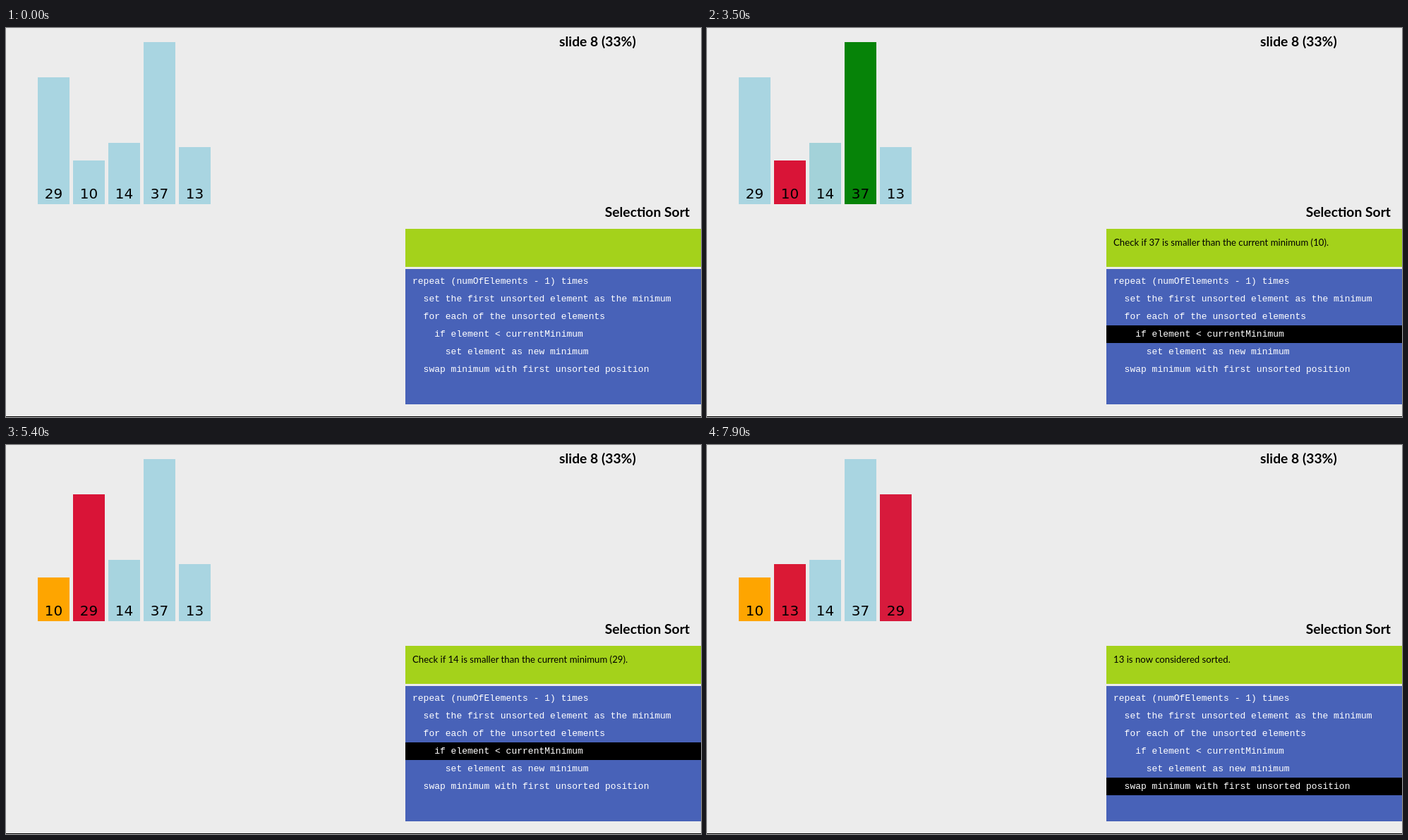
An HTML page for the animation above (8 s loop, 985 by 552 pixels).

```html
<!DOCTYPE html>
<html lang="en">
<meta charset="utf-8">
<title>Selection Sort</title>
<style>
  html, body { margin: 0; width: 100%; height: 100%; overflow: hidden; background: #ececec; }
  svg { position: absolute; left: 0; top: 0; }
  .head { font: bold 19.3px Lato, sans-serif; }
  .num { font: 20px "DejaVu Sans", sans-serif; text-anchor: middle; }
  .code { font: 13px "Liberation Mono", monospace; fill: #fff; white-space: pre; }
  #status { position: absolute; left: 576px; top: 296px; width: 400px; font: 13.2px/17px Lato, sans-serif; }
</style>
<svg id="stage" width="985" height="552">
  <text class="head" x="784" y="26">slide 8 (33%)</text>
  <text class="head" x="969" y="268" text-anchor="end">Selection Sort</text>
  <rect x="566" y="285" width="419" height="54" fill="#a4d21b"/>
  <rect x="566" y="342" width="419" height="192" fill="#4862b8"/>
  <rect y="551" width="985" height="1"/>
</svg>
<div id="status"></div>
<script>
const LOOP = 8000, START = 1800, STEP = 354, DELAY = 15;
const PLAIN = [169, 213, 225], MIN = [217, 20, 55], CHECK = [0, 128, 0], SORTED = [254, 165, 0];
const values = [29, 10, 14, 37, 13];
const code = [
  'repeat (numOfElements - 1) times',
  '  set the first unsorted element as the minimum',
  '  for each of the unsorted elements',
  '    if element < currentMinimum',
  '      set element as new minimum',
  '  swap minimum with first unsorted position'
];
const stage = document.getElementById('stage');
const statusBox = document.getElementById('status');

function add(tag, attrs, text = '') {
  const el = document.createElementNS('http://www.w3.org/2000/svg', tag);
  for (const key in attrs) el.setAttribute(key, attrs[key]);
  el.textContent = text;
  return stage.appendChild(el);
}

// Each state holds the message, the marked code lines, and a slot and colour per bar.
function sortStates() {
  const order = values.map((_, i) => i), states = [];
  let sorted = 0;
  const push = (text, lines, marks = {}) => {
    const slot = [], color = [];
    order.forEach((bar, i) => {
      slot[bar] = i;
      color[bar] = marks[i] || (i < sorted ? SORTED : PLAIN);
    });
    states.push({ text, lines, slot, color });
  };
  const at = i => values[order[i]];
  push('', []);
  for (let i = 0; i < 2; i++) {
    let min = i;
    push(`Iteration ${i + 1}: Set ${at(i)} as the current minimum, then iterate through the remaining unsorted elements to find the true minimum.`,
      [0, 1, 2], { [i]: MIN });
    for (let j = i + 1; j < order.length; j++) {
      push(`Check if ${at(j)} is smaller than the current minimum (${at(min)}).`, [3], { [min]: MIN, [j]: CHECK });
      if (at(j) < at(min)) {
        min = j;
        push(`Set ${at(j)} as the new minimum.`, [4], { [j]: MIN });
      }
    }
    const text = `Swap the minimum (${at(min)}) with the first unsorted element (${at(i)}).`;
    const pair = { [i]: MIN, [min]: MIN };
    push(text, [5], pair);
    [order[i], order[min]] = [order[min], order[i]];
    push(text, [5], pair);
    sorted++;
    push(`${at(i)} is now considered sorted.`, [5]);
  }
  return states;
}

const states = sortStates();
const marks = code.map((line, i) => {
  const mark = add('rect', { x: 566, y: 347 + 25 * i, width: 419, height: 25 });
  add('text', { class: 'code', x: 576, y: 363 + 25 * i }, line);
  return mark;
});
const bars = values.map(v => {
  const h = Math.round(v * 230 / 37);
  return { rect: add('rect', { y: 250 - h, width: 45, height: h }), label: add('text', { class: 'num', y: 242 }, v) };
});

const mix = (a, b, p) => a + (b - a) * p;
const ease = u => u < 0.5 ? 4 * u ** 3 : 1 - 4 * (1 - u) ** 3;

function draw(t) {
  const since = t - START;
  const k = Math.min(states.length - 1, Math.max(0, Math.floor(since / STEP) + 1));
  const now = states[k], before = states[Math.max(0, k - 1)];
  const u = (since - (k - 1) * STEP - DELAY) / (STEP - DELAY);
  const p = ease(Math.min(1, Math.max(0, u)));
  if (statusBox.textContent !== now.text) statusBox.textContent = now.text;
  marks.forEach((mark, i) => mark.setAttribute('visibility', now.lines.includes(i) ? 'visible' : 'hidden'));
  bars.forEach(({ rect, label }, i) => {
    const x = 45 + 50 * mix(before.slot[i], now.slot[i], p);
    rect.setAttribute('x', x);
    label.setAttribute('x', x + 22.5);
    rect.setAttribute('fill', `rgb(${now.color[i].map((c, n) => Math.round(mix(before.color[i][n], c, p)))})`);
  });
}

function tick() {
  draw(performance.now() % LOOP);
  requestAnimationFrame(tick);
}
tick();
</script>
</html>
```
